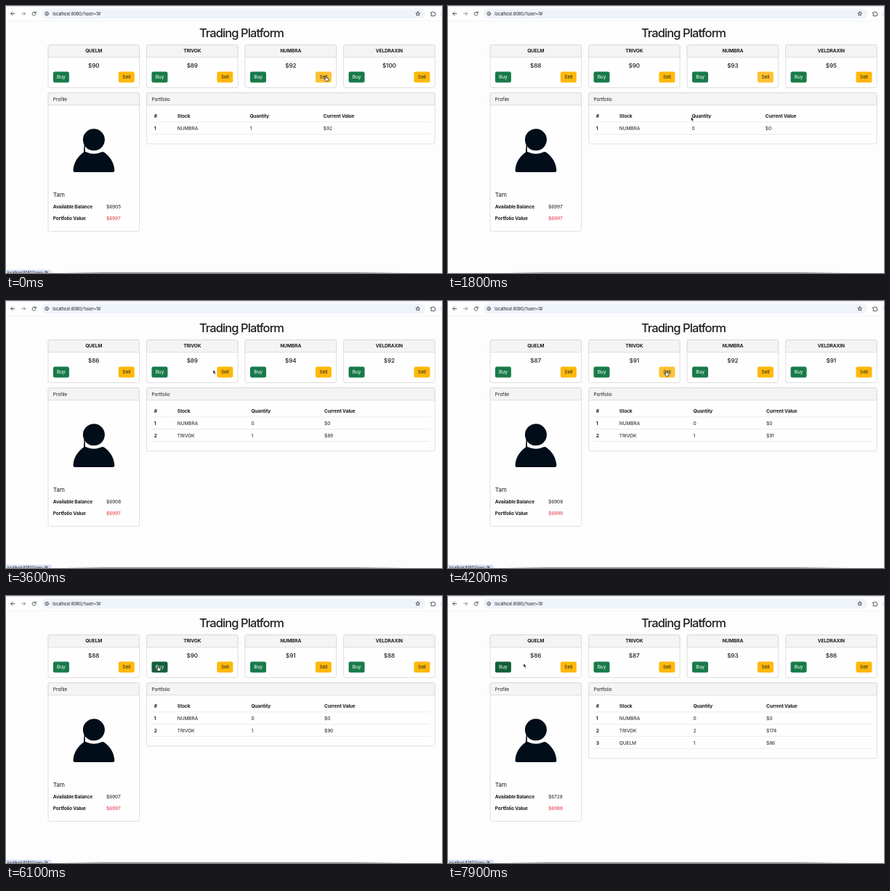
An HTML page for the animation above (8 s loop, 600x368 px).

```html
<!DOCTYPE html>
<html lang="en">
<head>
<meta charset="utf-8">
<title>Trading Platform</title>
<style>
  html, body { margin: 0; width: 100%; height: 100%; overflow: hidden; background: #fdfdfd; }
  svg { display: block; width: 100vw; height: 100vh; }
  text { font: 400 6.6px Inter, "Open Sans", sans-serif; letter-spacing: -.015em; fill: #1c1f23; white-space: pre; }
  .b { font-weight: 700; letter-spacing: -.022em; }
  .c { text-anchor: middle; }
  .h1 { font-size: 16.5px; font-weight: 500; letter-spacing: -.055em; }
  .h5 { font-size: 8.2px; font-weight: 500; }
  .url { font-size: 5.8px; }
  .tip { font-size: 4.9px; }
  .red { fill: #e52f40; }
  .card { fill: #fefefe; stroke: #d3d3d3; stroke-width: .7; }
  .head { fill: #f4f4f4; stroke: #d3d3d3; stroke-width: .7; }
  .rule { stroke: #dcdfe2; stroke-width: .6; }
  .buy { fill: #177b49; } .buy.on { fill: #126039; }
  .sell { fill: #ffb80a; } .sell.on { fill: #ffc130; }
  .light { fill: #fff; }
  .icon { fill: none; stroke: #43474c; stroke-width: .9; stroke-linecap: round; stroke-linejoin: round; }
</style>
</head>
<body>
<svg id="stage" viewBox="0 0 600 368" preserveAspectRatio="none">
  <defs>
    <linearGradient id="edge">
      <stop offset="0" stop-color="#999" stop-opacity="0"/>
      <stop offset=".12" stop-color="#999"/>
      <stop offset=".85" stop-color="#999"/>
      <stop offset="1" stop-color="#999" stop-opacity="0"/>
    </linearGradient>
  </defs>
  <rect width="600" height="368" fill="#fdfdfd"/>

  <g id="toolbar">
    <rect width="600" height="20.4" fill="#fefefe"/>
    <rect width="600" height="1" fill="#d9e4f8"/>
    <rect y="20.2" width="600" height=".5" fill="#e4e6ea"/>
    <rect x="49" y="3.6" width="528" height="13.8" rx="6.9" fill="#eff3fa"/>
    <path class="icon" d="M11.8 10.6H6.8M9.1 8.2 6.7 10.6 9.1 13"/>
    <path class="icon" stroke-opacity=".6" d="M21.6 10.6h5M24.3 8.2l2.4 2.4-2.4 2.4"/>
    <path class="icon" d="M40.9 9.6A2.5 2.5 0 1 0 41 11.6M41.2 7.8v2h-2"/>
    <circle class="icon" cx="56.2" cy="10.6" r="2.4" stroke-width=".6"/>
    <path class="icon" stroke-width=".6" d="M56.2 10.4v1.4M56.2 9.2v.1"/>
    <path class="icon" stroke-width=".7" d="M566.7 7.7l.8 1.9 2 .2-1.5 1.3.5 2-1.8-1.1-1.8 1.1.5-2-1.5-1.3 2-.2z"/>
    <path class="icon" d="M585 8.9h1.5a1 1 0 0 1 2 0h1.7v1.6a1 1 0 0 1 0 2v1.2H585v-1.4a1 1 0 0 0 0-2z"/>
    <rect x="598.4" y="7" width=".8" height="7" fill="#c6d7f5"/>
    <text class="url" x="64.2" y="12.7">localhost:8080/?user=1#</text>
  </g>

  <text class="h1 c" x="324" y="43.4">Trading Platform</text>
  <g id="page"></g>

  <g transform="translate(120.9 184.3)" fill="#010d18">
    <circle r="15"/>
    <path d="M-26 44.6Q-28.6 44.6-28.4 41.6C-27.5 31-22 23-14 17.3Q-12-16-12 16.6Q-12 16.2-10 17.2Q0 21.8 10 17.2Q12 16.2 14 17.3C22 23 27.5 31 28.4 41.6Q28.6 44.6 26 44.6Z"/>
  </g>

  <rect x="80" y="366.8" width="470" height="1.2" fill="url(#edge)"/>
  <g id="status">
    <path d="M0 363.4H60.5Q62.5 363.4 62.5 365.4V368H0Z" fill="#d8e2f6"/>
    <text class="tip" x="2" y="368.8">localhost:8080/?user=1#</text>
  </g>
  <path id="arrow" d="M0 0V5.3L1.3 4.2 2.2 6.3 3.2 5.9 2.3 3.8H4Z" fill="#111" stroke="#fff" stroke-width=".45"/>
  <path id="hand" d="M-.8.6Q0-.5.8.6V2.6L3 3.1Q3.7 3.4 3.6 4.2L3 6.9H-.5L-2.4 4.3Q-2.4 3.3-1.5 3.6L-.8 4.2Z" fill="#fff" stroke="#111" stroke-width=".7" stroke-linejoin="round"/>
</svg>
<script>
const LOOP = 8000;
const STOCKS = ["QUELM", "TRIVOK", "NUMBRA", "VELDRAXIN"];
// one row of quotes per second
const QUOTES = [
  [90, 89, 92, 100], [87, 92, 94, 97], [88, 90, 93, 95],
  [86, 89, 94, 92], [87, 91, 92, 91], [86, 89, 90, 90],
  [88, 90, 91, 88], [89, 90, 92, 87], [86, 87, 93, 86]
];
// time, stock, quantity
const TRADES = [
  [150, 2, -1], [2950, 1, 1], [5250, 1, -1],
  [5920, 1, 1], [6220, 1, 1], [7350, 0, 1]
];
const ROWS = [2, 1, 0];
// time, x, y
const PATH = [
  [0, 440.3, 96.5], [1000, 440.3, 96.5], [1200, 425, 116], [1750, 345, 152],
  [2150, 262, 160], [2650, 219, 94.5], [3350, 219, 94.5], [3600, 285, 95],
  [3900, 300.5, 96.5], [5400, 300.5, 96.5], [5800, 209.5, 96.5], [6850, 209.5, 96.5],
  [7250, 75, 95.5], [7820, 75, 95.5], [7890, 104, 93], [8000, 104, 93]
];
const STEP = 135.55;

const $ = id => document.getElementById(id);
const page = $("page");

function add(tag, attrs, text = "", parent = page) {
  const el = document.createElementNS("http://www.w3.org/2000/svg", tag);
  for (const k in attrs) el.setAttribute(k, attrs[k]);
  el.textContent = text;
  return parent.appendChild(el);
}
const label = (x, y, text, cls = "", parent) => add("text", { x, y, class: cls }, text, parent);
const rule = (y, parent) => add("line", { x1: 200, x2: 583.5, y1: y, y2: y, class: "rule" }, "", parent);
const show = (el, on) => el.setAttribute("visibility", on ? "visible" : "hidden");

function card(x, y, width, height) {
  const box = add("rect", { x, y, width, height, rx: 2.5, class: "card" });
  const r = x + width;
  add("path", {
    class: "head",
    d: `M${x} ${y + 17}V${y + 2.5}Q${x} ${y} ${x + 2.5} ${y}H${r - 2.5}Q${r} ${y} ${r} ${y + 2.5}V${y + 17}Z`
  });
  return box;
}

const buttons = [];
function button(x, kind, text) {
  const el = add("rect", { x, y: 90.4, width: 22, height: 15.2, rx: 2.5 });
  label(x + 11, 100.4, text, kind === "buy" ? "c light" : "c");
  buttons.push({ el, x, kind });
}

const prices = STOCKS.map((name, i) => {
  const x = 58 + i * STEP;
  card(x, 53.6, 125.5, 58.9);
  label(x + 62.7, 64.4, name, "b c");
  button(x + 6.9, "buy", "Buy");
  button(x + 96.8, "sell", "Sell");
  return label(x + 62.7, 85, "", "h5 c");
});

card(58, 119.6, 125.5, 191);
label(64.8, 130.5, "Profile");
label(64.8, 262.6, "Tam", "h5").style.fontWeight = 400;
label(64.8, 278.6, "Available Balance", "b");
label(64.8, 295, "Portfolio Value", "b");
const balance = label(138, 278.6, "");
const worth = label(138, 295, "", "red");

const table = card(193.6, 119.6, 396.5, 70);
label(200.4, 130.5, "Portfolio");
label(203.8, 154, "#", "b");
label(235.8, 154, "Stock", "b");
const qtyCol = [label(0, 154, "Quantity", "b")];
const valueCol = [label(0, 154, "Current Value", "b")];
rule(159.8);
const rows = ROWS.map((stock, i) => {
  const g = add("g", {}), y = 170.9 + i * 16.8;
  label(203.8, y, i + 1, "b", g);
  label(235.8, y, STOCKS[stock], "", g);
  qtyCol.push(label(0, y, "", "", g));
  valueCol.push(label(0, y, "", "", g));
  rule(176.6 + i * 16.8, g);
  return g;
});

const quotesAt = t => QUOTES[Math.floor((t + 380) / 1000)];

function account(t) {
  const held = [0, 0, 1, 0], seen = new Set([2]);
  let cash = 6905;
  for (const [at, stock, qty] of TRADES) {
    if (at > t) break;
    held[stock] += qty;
    cash -= qty * quotesAt(at)[stock];
    seen.add(stock);
  }
  return { held, cash, count: seen.size };
}

function pointer(t) {
  const i = PATH.findIndex(p => p[0] > t);
  const [t0, x0, y0] = PATH[i - 1], [t1, x1, y1] = PATH[i];
  const u = (t - t0) / (t1 - t0);
  return [x0 + (x1 - x0) * u, y0 + (y1 - y0) * u];
}

function draw(t) {
  const quotes = quotesAt(t), { held, cash, count } = account(t);
  prices.forEach((el, i) => el.textContent = "$" + quotes[i]);
  balance.textContent = "$" + cash;
  worth.textContent = "$" + held.reduce((sum, n, i) => sum + n * quotes[i], cash);

  table.setAttribute("height", 70.4 + (count - 1) * 16.9);
  qtyCol.forEach(el => el.setAttribute("x", count > 1 ? 337.4 : 335.4));
  valueCol.forEach(el => el.setAttribute("x", count > 1 ? 438 : 436.8));
  rows.forEach((g, i) => {
    const stock = ROWS[i];
    show(g, i < count);
    qtyCol[i + 1].textContent = held[stock];
    valueCol[i + 1].textContent = "$" + held[stock] * quotes[stock];
  });

  const [x, y] = pointer(t);
  const over = buttons.findIndex(b => x > b.x && x < b.x + 22 && y > 90.4 && y < 105.6);
  // a clicked button keeps its tint for a while
  const kept = t < 2000 ? 5 : t > 7300 ? 0 : -1;
  buttons.forEach((b, i) => b.el.setAttribute("class", b.kind + (i === over || i === kept ? " on" : "")));
  for (const [id, on] of [["hand", over >= 0], ["arrow", over < 0]]) {
    $(id).setAttribute("transform", `translate(${x} ${y})`);
    show($(id), on);
  }
  show($("status"), t < 1450 || t > 2850);
}

function loop() {
  draw(performance.now() % LOOP);
  requestAnimationFrame(loop);
}
loop();
</script>
</body>
</html>
```
